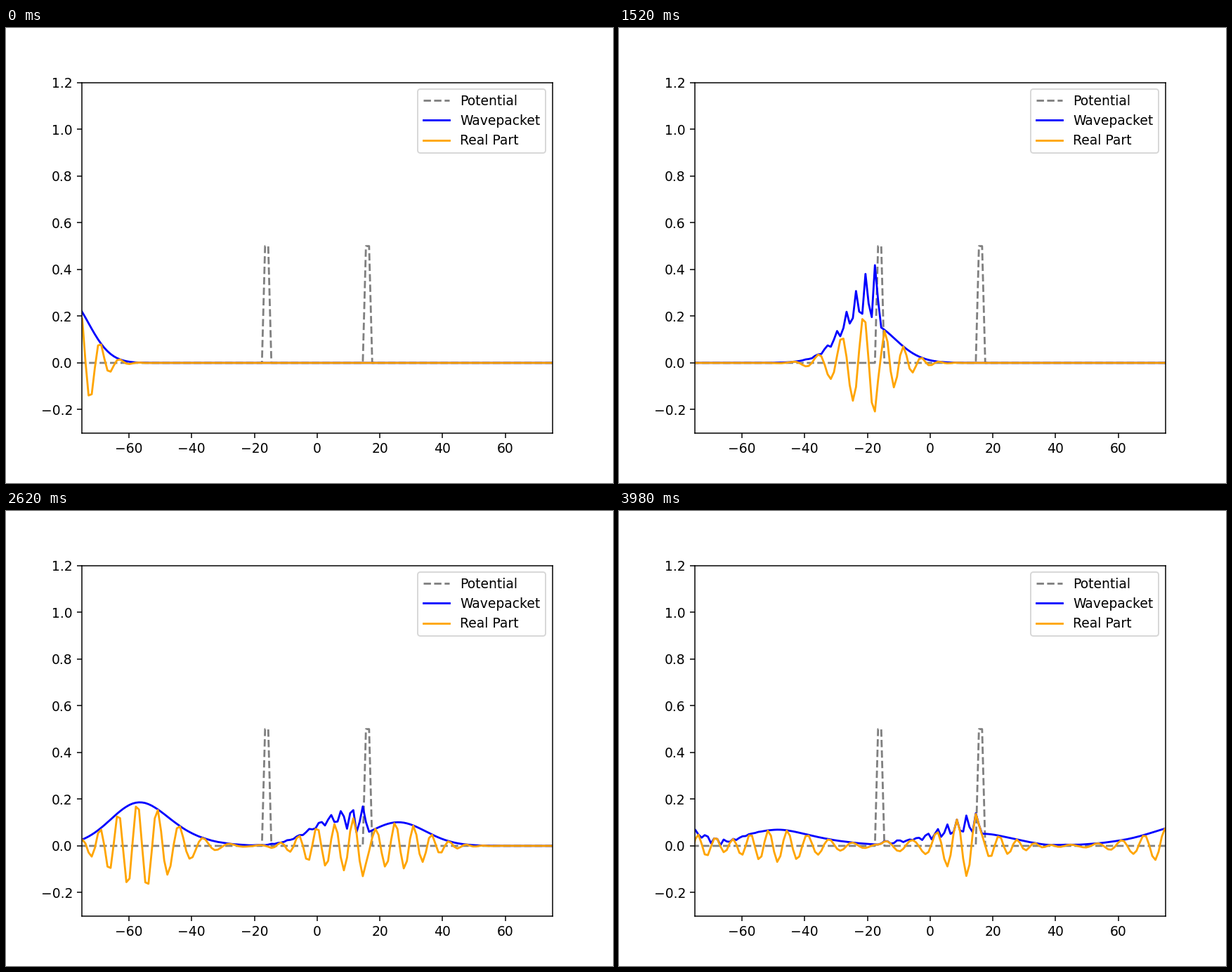
A matplotlib script for the animation above (4000 ms loop, 864 px wide and 648 px high).

```python
import numpy as np
import matplotlib.pyplot as plt
from matplotlib.animation import FuncAnimation

FRAMES = 200
INTERVAL = 20
DT = 1.0
DX = 1.0  # lattice step of the Hamiltonian

# Grid, double barrier and Gaussian wavepacket
x = np.linspace(-100, 100, 200)
potential = np.where((np.abs(x) > 15) & (np.abs(x) < 17), 0.5, 0.0)

x0, sigma, k0 = -80, 5, 1
psi0 = np.exp(-((x - x0) ** 2) / (4 * sigma**2) + 1j * k0 * x)
psi0 /= (2 * np.pi * sigma**2) ** 0.25


def crank_nicolson():
    """One-step propagator with hard walls at both ends of the grid."""
    n = len(x)
    hop = np.eye(n, k=1) + np.eye(n, k=-1)
    h = (2 * np.eye(n) - hop) / (2 * DX**2) + np.diag(potential)
    half = 0.5j * DT * h
    return np.linalg.solve(np.eye(n) + half, np.eye(n) - half)


step = crank_nicolson()
states = [psi0]
for _ in range(FRAMES - 1):
    states.append(step @ states[-1])

fig, ax = plt.subplots(figsize=(6.4, 4.8), dpi=135)
ax.set_xlim(-75, 75)
ax.set_ylim(-0.3, 1.2)
ax.plot(x, potential, "--", color="gray", label="Potential")
(packet,) = ax.plot(x, np.abs(psi0), color="blue", label="Wavepacket")
(real,) = ax.plot(x, psi0.real, color="orange", label="Real Part")
ax.legend(loc="upper right")


def update(i):
    packet.set_ydata(np.abs(states[i]))
    real.set_ydata(states[i].real)
    return packet, real


anim = FuncAnimation(fig, update, frames=FRAMES, interval=INTERVAL,
                     repeat=True, repeat_delay=0)
plt.show()
```
